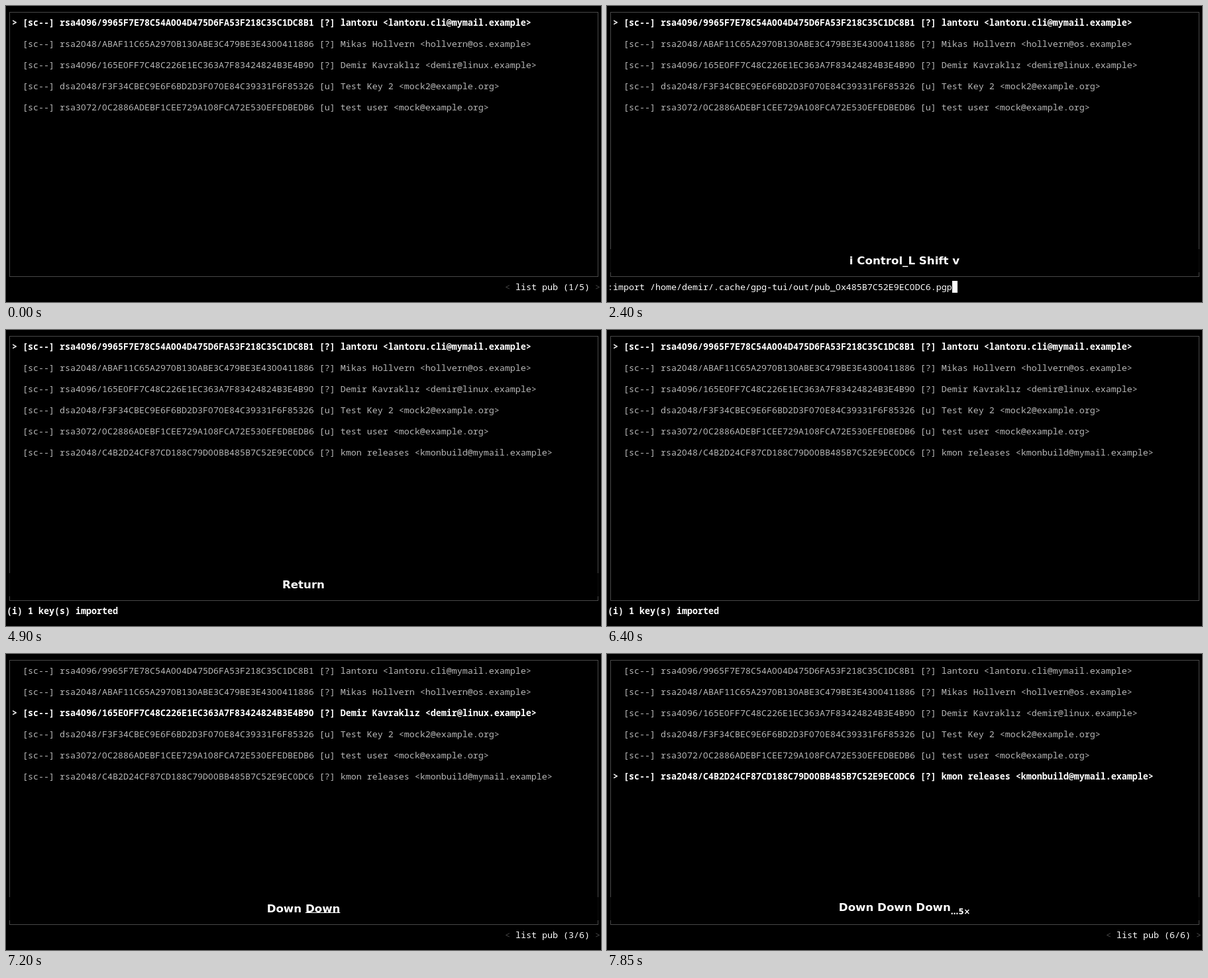
An HTML page that plays this animation: 898x448 px, repeating every 8000 ms.

```html
<!DOCTYPE html>
<html lang="en">
<head>
<meta charset="utf-8">
<title>Key list</title>
<style>
  html, body { margin: 0; width: 100%; height: 100%; overflow: hidden; background: #000; }
  #stage { position: relative; width: 898px; height: 448px; overflow: hidden; background: #000;
    font: 13.3333px/16px "Noto Sans Mono", monospace; color: #b8b8b8; }
  #stage > div { position: absolute; white-space: pre; }
  #frame { left: 5px; top: 9px; width: 887px; height: 399px; border: 1px solid #484848; }
  .row { left: 9px; }
  .row.on { color: #fff; font-weight: 700; }
  /* plain zero, padded to the cell width */
  .z { font-family: "Noto Sans", sans-serif; letter-spacing: .028em; }
  #status { left: 1px; right: 1px; top: 417px; height: 16px; color: #fff; }
  #status.list { text-align: right; }
  #status.msg { font-weight: 700; }
  .dim { color: #484848; }
  .cursor { background: #fff; }
  #keys { left: 0; top: 368px; width: 898px; height: 35px; background: rgba(0, 0, 0, .8); color: #fff;
    font: 700 16.65px/35px "DejaVu Sans", sans-serif; text-align: center; }
  #keys p { margin: 0; position: relative; }
  #keys p.many { top: -2px; }
  #keys span { text-decoration: none; }
  #keys .live { text-decoration: underline 1px; text-underline-offset: 0px; text-decoration-skip-ink: none; }
  #keys .count { position: relative; top: 5px; font-size: 11.6px; line-height: 0; }
</style>
</head>
<body>
<div id="stage">
  <div id="frame"></div>
  <div id="status"></div>
  <div id="keys"><p></p></div>
</div>
<script>
const LOOP = 8000;
const PATH = '/home/demir/.cache/gpg-tui/out/pub_0x485B7C52E9EC0DC6.pgp';

const KEYS = [
  'rsa4096/9965F7E78C54A004D475D6FA53F218C35C1DC8B1 [?] lantoru <lantoru.cli@mymail.example>',
  'rsa2048/ABAF11C65A2970B130ABE3C479BE3E4300411886 [?] Mikas Hollvern <hollvern@os.example>',
  'rsa4096/165E0FF7C48C226E1EC363A7F83424824B3E4B90 [?] Demir Kavraklız <demir@linux.example>',
  'dsa2048/F3F34CBEC9E6F6BD2D3F070E84C39331F6F85326 [u] Test Key 2 <mock2@example.org>',
  'rsa3072/0C2886ADEBF1CEE729A108FCA72E530EFEDBEDB6 [u] test user <mock@example.org>',
  'rsa2048/C4B2D24CF87CD188C79D00BB485B7C52E9EC0DC6 [?] kmon releases <kmonbuild@mymail.example>'
];

// Each step changes part of the state at its time in ms.
const press = (keys, more) => ({ keys, live: true, ...more });
const idle = { live: false };
const hide = { keys: '' };
const STEPS = [
  [0, { mode: 'list', total: 5, sel: 1, text: '', keys: '', live: false }],
  [1000, press('i')],
  [1050, { mode: 'prompt', text: ':import ' }],
  [1200, idle],
  [1900, press('i Control_L')],
  [1950, press('i Control_L Shift')],
  [2150, idle],
  [2200, press('i Control_L Shift v')],
  [2250, { text: ':import ' + PATH }],
  [2400, idle],
  [3900, hide],
  [4700, press('Return')],
  [4750, { mode: 'msg', text: '(i) 1 key(s) imported', total: 6 }],
  [4900, idle],
  [6400, hide],
  [6650, { mode: 'list' }],
  [7000, press('Down')],
  [7050, { sel: 2 }],
  [7200, press('Down Down', { sel: 3 })],
  [7350, press('Down Down Down')],
  [7400, { sel: 4 }],
  [7500, press('Down Down Down …4×')],
  [7550, { sel: 5 }],
  [7650, press('Down Down Down …5×', { sel: 6 })],
  [7850, idle]
];

const $ = s => document.querySelector(s);
const stage = $('#stage'), status = $('#status'), overlay = $('#keys'), label = $('#keys p');
const escape = s => s.replace(/</g, '&lt;').replace(/>/g, '&gt;');
const cells = s => escape(s).replace(/0+/g, '<span class="z">$&</span>');

const rows = KEYS.map((key, i) => {
  const row = document.createElement('div');
  row.className = 'row';
  row.style.top = 17 + 32 * i + 'px';
  stage.insertBefore(row, status);
  return row;
});

function drawStatus({ mode, text, sel, total }) {
  status.className = mode;
  if (mode === 'list') {
    status.innerHTML = '<span class="dim">&lt;</span> ' + cells(`list pub (${sel}/${total})`) +
      ' <span class="dim">&gt;</span>';
  } else {
    status.innerHTML = cells(text) + (mode === 'prompt' ? '<span class="cursor"> </span>' : '');
  }
}

function drawKeys({ keys, live }) {
  overlay.style.display = keys ? 'block' : 'none';
  const words = keys.split(' ');
  const last = words.pop();
  const many = last.startsWith('…');
  const cls = (live ? 'live ' : '') + (many ? 'count' : '');
  label.className = many ? 'many' : '';
  label.innerHTML = words.join(' ') + (words.length && !many ? ' ' : '') +
    `<span class="${cls}">${last}</span>`;
}

function draw(state) {
  rows.forEach((row, i) => {
    const on = i + 1 === state.sel;
    row.classList.toggle('on', on);
    row.style.display = i < state.total ? 'block' : 'none';
    row.innerHTML = cells((on ? '> ' : '  ') + '[sc--] ' + KEYS[i]);
  });
  drawStatus(state);
  drawKeys(state);
}

let shown = 0;
function tick() {
  const t = performance.now() % LOOP;
  const past = STEPS.filter(([at]) => at <= t);
  if (past.length !== shown) {
    shown = past.length;
    draw(Object.assign({}, ...past.map(([, change]) => change)));
  }
  requestAnimationFrame(tick);
}
tick();
</script>
</body>
</html>
```
